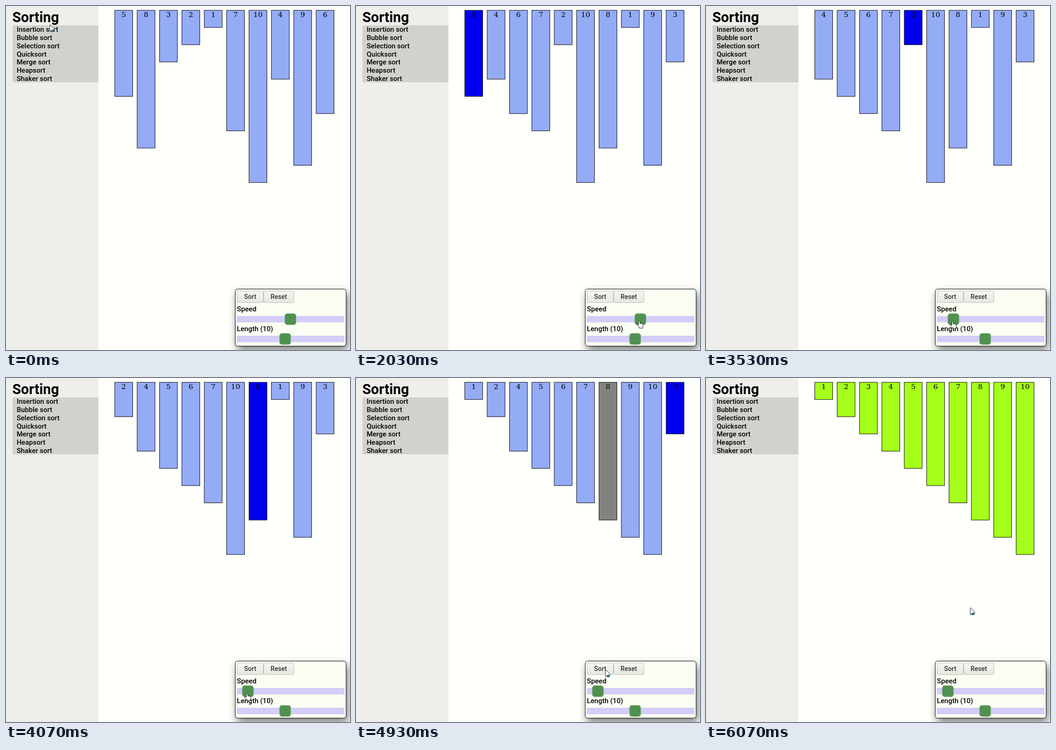
Write an HTML page that moves like this. It is 748x748 px and loops after 6.51 s.

```html
<!DOCTYPE html>
<html lang="en">
<head>
<meta charset="utf-8">
<title>Sorting</title>
<style>
html, body { margin: 0; width: 100%; height: 100%; overflow: hidden; background: #fffffc; }
svg { display: block; width: 100%; height: 100%; }
text { font: 500 15.2px Roboto, sans-serif; }
.title { font-weight: 700; font-size: 30.8px; }
#menu text { font-size: 15px; }
.button { font-size: 14px; text-anchor: middle; fill: #333; }
.bar rect { stroke: #000; }
.bar text { font: 15.6px "DejaVu Serif", serif; text-anchor: middle; }
.thumb { fill: #519150; stroke: #73a072; }
.track { fill: #d3cdf8; }
</style>
</head>
<body>
<svg viewBox="0 0 748 748">
  <defs>
    <linearGradient id="face" x2="0" y2="1">
      <stop stop-color="#f5f5f2"/><stop offset="1" stop-color="#e6e6e2"/>
    </linearGradient>
    <filter id="shadow" x="-20%" y="-30%" width="140%" height="160%">
      <feDropShadow dx="4" dy="8" stdDeviation="9" flood-color="#000" flood-opacity=".55"/>
    </filter>
  </defs>
  <rect width="748" height="748" fill="#fffffc"/>
  <rect width="201" height="748" fill="#eeefeb"/>
  <path d="M201 42H18a4 4 0 0 0-4 4V162a4 4 0 0 0 4 4H201Z" fill="#d1d2cd"/>
  <text class="title" x="13.7" y="35">Sorting</text>
  <g id="menu"></g>
  <g id="bars"></g>
  <rect x="498.5" y="615.5" width="241" height="124" rx="5" fill="#fbfff3" stroke="#000" filter="url(#shadow)"/>
  <g fill="url(#face)" stroke="#b9b9b5">
    <rect x="502.5" y="619.5" width="57" height="25.5" rx="3"/>
    <rect x="560.5" y="619.5" width="65.5" height="25.5" rx="3"/>
  </g>
  <text class="button" x="531" y="637">Sort</text>
  <text class="button" x="593" y="637">Reset</text>
  <text x="502" y="664">Speed</text>
  <text x="502" y="707">Length (10)</text>
  <rect class="track" x="502" y="674" width="234" height="14"/>
  <rect class="track" x="502" y="717" width="234" height="14"/>
  <rect class="thumb" id="speed" y="669" width="24" height="24" rx="5"/>
  <rect class="thumb" x="595" y="712" width="24" height="24" rx="5"/>
  <g id="cursor" stroke-linejoin="round">
    <g id="arrow">
      <path d="M.5 1.5Q.8 0 2 1L10 9.5Q11.500 12 9 12L5 12.500L2 15.500Q.5 16.500.5 15Z" fill="#fff" stroke="#222"/>
      <ellipse cx="6.5" cy="14" rx="3.500" ry="2.200" fill="#2c7f9c" stroke="#223" stroke-width=".6"/>
    </g>
    <path id="hand" d="M-.5 1.500Q1-.5 2.500 1.500V6L8 7.200Q10 7.500 9.700 9.500L8.500 14V16.500H1V14L-4 9.500Q-4 7.500-2 8L-.5 9Z" fill="#fff" stroke="#111"/>
  </g>
</svg>
<script>
const LOOP = 6510, LOAD = 600;
const FILL = { idle: '#94abf6', key: '#0000f0', probe: '#82837e', done: '#a5ff1a' };
const before = [5, 8, 3, 2, 1, 7, 10, 4, 9, 6];
const after = [5, 4, 6, 7, 2, 10, 8, 1, 9, 3];

const $ = id => document.getElementById(id);
const mix = (a, b, u) => a + (b - a) * u;
const span = (t, from, to) => Math.min(1, Math.max(0, (t - from) / (to - from)));
const smooth = u => u * u * (3 - 2 * u);
const easeOut = u => 1 - (1 - u) ** 3;

function add(parent, tag, attrs, text = '') {
  const el = document.createElementNS('http://www.w3.org/2000/svg', tag);
  for (const k in attrs) el.setAttribute(k, attrs[k]);
  el.textContent = text;
  return parent.appendChild(el);
}

// Steps get shorter as the slider moves, down to 48 ms each
const stepTime = k => 3424 + 48 * k - 1485 * 0.77 ** k;

function insertionSort(input) {
  const list = input.slice(), steps = [];
  const step = (key, probe, done = 0) =>
    steps.push({ time: stepTime(steps.length), list: list.slice(), key, probe, done });
  for (let i = 0; i < list.length; i++) {
    step(i, -1);
    let j = i - 1;
    for (; j >= 0; j--) {
      step(i, j);
      if (list[j] < list[i]) break;
    }
    list.splice(j + 1, 0, list.splice(i, 1)[0]);
  }
  for (let n = 1; n <= list.length; n++) step(-1, -1, n);
  return steps;
}

const rest = { key: -1, probe: -1, done: 0 };
const steps = [
  { ...rest, time: 0, list: before },
  { ...rest, time: LOAD, list: after },
  ...insertionSort(after)
];

const thumbX = t => mix(618.5, 526, smooth(span(t, 1990, 3980)));

function cursorAt(t) {
  const drag = [thumbX(t) - 3, 685];
  const moves = [
    [100, 400, 95, 53], [800, 1430, 545, 612], [1530, 2170, ...drag],
    [4500, 4930, 542, 635], [4930, 5570, 574, 499]
  ];
  return moves.reduce(([x, y], [from, to, toX, toY]) => {
    const u = easeOut(span(t, from, to));
    return [mix(x, toX, u), mix(y, toY, u)];
  }, [95, 40]);
}

const links = ['Insertion ', 'Bubble ', 'Selection ', 'Quick', 'Merge ', 'Heap', 'Shaker '].map((name, i) =>
  add($('menu'), 'text', { x: 23.2, y: 56.3 + i * 17.75 }, name + 'sort'));

const bars = before.map((_, i) => {
  const g = add($('bars'), 'g', { class: 'bar' }), x = 236.5 + i * 48.65;
  return {
    rect: add(g, 'rect', { x, y: 9.3, width: 38.9 }),
    label: add(g, 'text', { x: x + 19.5, y: 23.5 })
  };
});

function draw(t) {
  const s = steps.filter(p => p.time <= t).pop();
  bars.forEach(({ rect, label }, i) => {
    const state = i < s.done ? 'done' : i === s.key ? 'key' : i === s.probe ? 'probe' : 'idle';
    rect.setAttribute('height', s.list[i] * 37.45);
    rect.setAttribute('fill', FILL[state]);
    label.textContent = s.list[i];
  });

  $('speed').setAttribute('x', thumbX(t) - 12);

  const [x, y] = cursorAt(t);
  const onLink = t > 200 && t < 800;
  const hand = onLink || (t > 1800 && t < 4560);
  links[0].setAttribute('text-decoration', onLink ? 'underline' : 'none');
  $('cursor').setAttribute('transform', `translate(${Math.round(x)} ${Math.round(y)})`);
  $('arrow').style.display = hand ? 'none' : '';
  $('hand').style.display = hand ? '' : 'none';
}

const start = performance.now();
function tick() {
  draw((performance.now() - start) % LOOP);
  requestAnimationFrame(tick);
}
tick();
</script>
</body>
</html>
```
